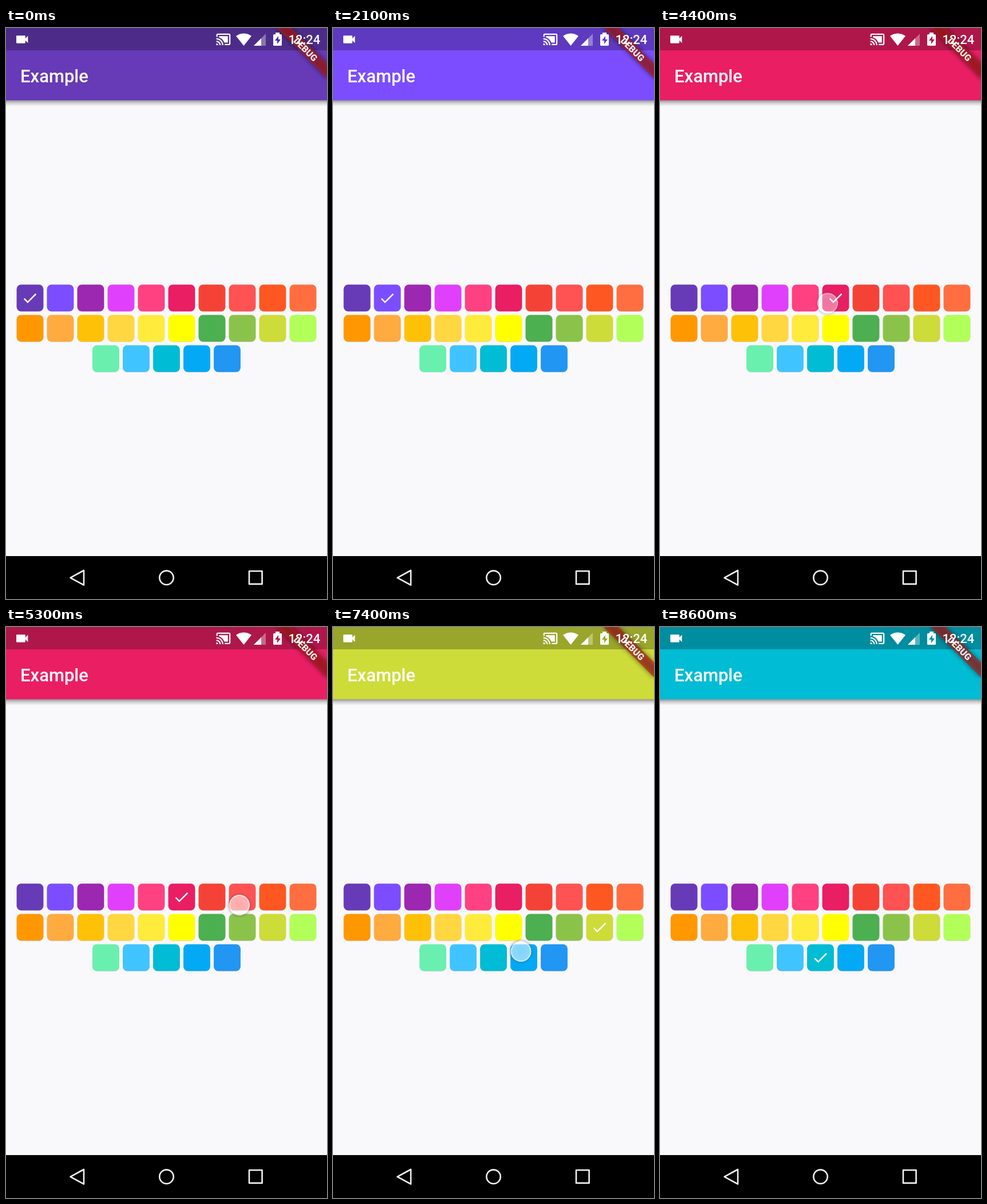
These frames come from a looping animation (561 px wide and 998 px high, 10 s). An HTML page:

```html
<!DOCTYPE html>
<html lang="en">
<head>
<meta charset="utf-8">
<title>Color picker</title>
<style>
  html, body { margin: 0; width: 100%; height: 100%; overflow: hidden; background: #f9f8fb; }
  svg { display: block; width: 100vw; height: 100vh; }
  text { font-family: Roboto, sans-serif; font-weight: 500; fill: #fff; }
</style>
</head>
<body>
<svg viewBox="0 0 561 998" preserveAspectRatio="none">
  <defs>
    <linearGradient id="barShadow" x2="0" y2="1">
      <stop offset="0" stop-opacity=".42"/>
      <stop offset=".45" stop-opacity=".17"/>
      <stop offset="1" stop-opacity="0"/>
    </linearGradient>
    <radialGradient id="spot">
      <stop offset="0" stop-color="#fff" stop-opacity=".5"/>
      <stop offset=".68" stop-color="#fff" stop-opacity=".56"/>
      <stop offset=".71" stop-color="#fff" stop-opacity=".8"/>
      <stop offset=".77" stop-color="#fff" stop-opacity=".75"/>
      <stop offset=".8" stop-color="#556" stop-opacity=".25"/>
      <stop offset="1" stop-color="#556" stop-opacity="0"/>
    </radialGradient>
    <filter id="soft" x="-20%" y="-100%" width="140%" height="300%">
      <feGaussianBlur stdDeviation="4"/>
    </filter>
  </defs>

  <rect width="561" height="998" fill="#f9f8fb"/>
  <rect y="126" width="561" height="11" fill="url(#barShadow)"/>
  <rect id="bar" width="561" height="126.3"/>
  <rect width="561" height="39" fill-opacity=".25"/>
  <text x="25" y="94.5" font-size="31">Example</text>

  <g transform="translate(561 0) rotate(45)">
    <rect x="-62.3" y="43.6" width="124.6" height="18.7" fill-opacity=".5" filter="url(#soft)"/>
    <rect x="-62.3" y="43.6" width="124.6" height="18.7" fill="#b71c1c" fill-opacity=".63"/>
    <text y="58.6" font-size="15.9" text-anchor="middle" style="font-weight:900" fill-opacity=".92">DEBUG</text>
  </g>

  <g fill="#fff">
    <path transform="translate(14.6 6.4) scale(1.13)" d="M17 10.5V7c0-.55-.45-1-1-1H4c-.55 0-1 .45-1 1v10c0 .55.45 1 1 1h12c.55 0 1-.45 1-1v-3.5l4 4v-11l-4 4z"/>
    <path transform="translate(366.5 6.5) scale(1.12)" d="M1 18v3h3c0-1.66-1.34-3-3-3zm0-4v2c2.76 0 5 2.24 5 5h2c0-3.87-3.13-7-7-7zm18-7H5v1.63c3.96 1.28 7.09 4.41 8.37 8.37H19V7zM1 10v2c4.97 0 9 4.03 9 9h2c0-6.08-4.93-11-11-11zm20-7H3c-1.1 0-2 .9-2 2v3h2V5h18v14h-7v2h7c1.1 0 2-.9 2-2V5c0-1.1-.9-2-2-2z"/>
    <path transform="translate(401.6 6) scale(1.16)" d="M12 21.5L23.64 7C23.19 6.66 18.71 3 12 3S.81 6.66.36 7z"/>
    <path d="M433 31H454V10z" fill-opacity=".35"/>
    <path d="M433 31H446V18z"/>
    <path fill-rule="evenodd" d="M471 8h7v3h2.5q1.5 0 1.5 1.5v17q0 1.5-1.5 1.5h-12q-1.5 0-1.5-1.5v-17q0-1.5 1.5-1.5h2.5zM476 14l-6 8h4v6l6-8h-4z"/>
    <text x="493.5" y="28" font-size="22">12:24</text>
  </g>

  <g id="swatches"></g>
  <path id="check" fill="#fff" d="M9 16.17L4.83 12l-1.42 1.41L9 19 21 7l-1.41-1.41z"/>
  <circle id="touch" r="23" fill="url(#spot)"/>

  <rect y="923" width="561" height="75"/>
  <g fill="none" stroke="#f2f2f2" stroke-width="2.6" stroke-linejoin="round">
    <path d="M112.5 960.8L136 948V973.6z"/>
    <circle cx="280.5" cy="960.8" r="12.2"/>
    <rect x="425" y="949.3" width="22.6" height="22.6"/>
  </g>
</svg>
<script>
const LOOP = 10000, SIZE = 46.8, PITCH = 53, TOP = 448.4;
const rows = [
  '673ab7 7c4dff 9c27b0 e040fb ff4081 e91e63 f44336 ff5252 ff5722 ff6e40',
  'ff9800 ffab40 ffc107 ffd740 ffeb3b ffff00 4caf50 8bc34a cddc39 b2ff59',
  '69f0ae 40c4ff 00bcd4 03a9f4 2196f3'
];
const taps = [
  { down: 1700, pick: 2100, fade: 2100, gone: 2100, x: 89, y: 486, swatch: 1 },
  { down: 3000, pick: 3300, fade: 3600, gone: 3700, x: 162, y: 527, swatch: 12 },
  { down: 4100, pick: 4400, fade: 4500, gone: 4600, x: 293, y: 481, swatch: 5 },
  { down: 5200, pick: 5500, fade: 5500, gone: 5600, x: 408, y: 486, swatch: 7 },
  { down: 6100, pick: 6400, fade: 6700, gone: 6800, x: 477.5, y: 509, swatch: 18 },
  { down: 7200, pick: 7500, fade: 7500, gone: 7500, x: 328.5, y: 567, swatch: 23 },
  { down: 8200, pick: 8500, fade: 8500, gone: 8600, x: 278, y: 583, swatch: 22 }
];
const byId = id => document.getElementById(id);
const bar = byId('bar'), check = byId('check'), touch = byId('touch');

const swatches = rows.flatMap((row, r) => {
  const colors = row.split(' ');
  const left = (561 - colors.length * PITCH) / 2 + (PITCH - SIZE) / 2;
  return colors.map((c, i) => ({ color: '#' + c, x: left + i * PITCH, y: TOP + r * PITCH }));
});

const box = (s, dy, fill, opacity) =>
  `<rect x="${s.x}" y="${s.y + dy}" width="${SIZE}" height="${SIZE}" rx="7.8" fill="${fill}" fill-opacity="${opacity}"/>`;
byId('swatches').innerHTML = swatches.map(s => box(s, .7, '#000', .14) + box(s, 0, s.color, 1)).join('');

function draw(t) {
  const picked = taps.filter(tap => t >= tap.pick).pop();
  const s = swatches[picked ? picked.swatch : 0];
  bar.setAttribute('fill', s.color);
  check.setAttribute('transform', `translate(${s.x + 7.8} ${s.y + 8.3}) scale(1.28)`);

  const tap = taps.find(tap => t >= tap.down && t < tap.gone);
  touch.setAttribute('opacity', !tap ? 0 : t < tap.pick ? 1 : t < tap.fade ? .75 : .4);
  if (tap) touch.setAttribute('transform', `translate(${tap.x} ${tap.y})`);
}

function tick() {
  draw(performance.now() % LOOP);
  requestAnimationFrame(tick);
}
tick();
</script>
</body>
</html>
```
